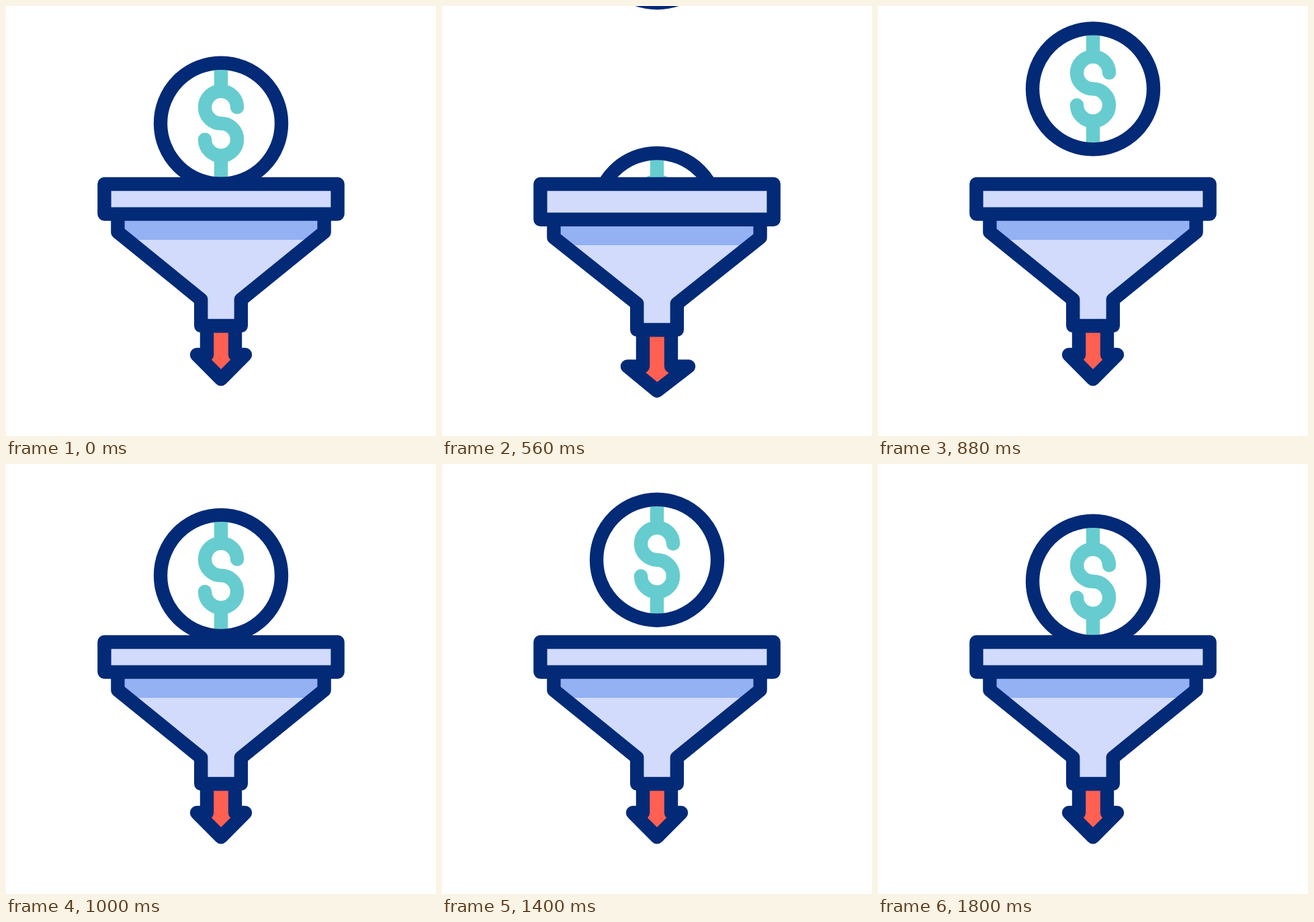
Write an HTML page that moves like this. It is 640 by 640 pixels and loops after 2 s.

```html
<!DOCTYPE html>
<html lang="en">
<head>
<meta charset="utf-8">
<title>Coin funnel</title>
<style>
  html, body { margin: 0; width: 100%; height: 100%; overflow: hidden; background: #fff; }
  svg { display: block; width: 100vw; height: 100vh; }
  .line { stroke: #032a77; stroke-width: 20.4; stroke-linejoin: round; stroke-linecap: round; }
  .teal { fill: none; stroke: #67cccf; stroke-width: 20.4; }
</style>
</head>
<body>
<svg viewBox="0 0 640 640">
  <defs>
    <clipPath id="above"><rect width="640" height="265"/></clipPath>
    <g id="coin">
      <circle r="90" fill="#fff"/>
      <path class="teal" d="M0-48V-88M0 48V88"/>
      <path class="teal" stroke-linecap="round" d="M24-24A24 24 0 1 0 0 0A24 24 0 1 1-24 24"/>
      <circle class="line" r="90" fill="none"/>
    </g>
  </defs>
  <path id="arrow" class="line" fill="#ff6052"/>
  <g clip-path="url(#above)">
    <use id="oldCoin" href="#coin"/>
    <use id="newCoin" href="#coin"/>
  </g>
  <path id="body" fill="#d2dbfc"/>
  <path id="shade" fill="#93b1f3"/>
  <path id="edge" class="line" fill="none"/>
  <path id="rim" class="line" fill="#d2dbfc"/>
</svg>
<script>
const LOOP = 2000, STEP = 40, REST = 174.7;
const $ = id => document.getElementById(id);
const ramp = (t, a, b) => Math.min(1, Math.max(0, (t - a) / (b - a)));
const ease = u => (1 - Math.cos(Math.PI * u)) / 2;

// Hop up a little, then drop into the funnel.
function oldY(t) {
  const peak = 293;
  if (t < peak) return REST - 32.5 * ease(ramp(t, 90, peak));
  return REST - 32.5 + 0.00234 * (t - peak) ** 2;
}

// Fall in from above, land, and bounce once.
function newY(t) {
  const land = 940, end = 1760;
  if (t < land) {
    const d = land - t;
    return REST - 0.882 * d + 0.000455 * d * d;
  }
  const u = 2 * ramp(t, land, end) - 1;
  return REST - 32.5 * (1 - u * u);
}

function place(id, y) {
  const shown = y > -110 && y < 400;
  $(id).setAttribute("visibility", shown ? "visible" : "hidden");
  $(id).setAttribute("transform", `translate(320 ${y.toFixed(2)})`);
}

function draw(t) {
  const stretch = t < 660 ? ease(ramp(t, 345, 660)) : 1 - ease(ramp(t, 660, 855));
  const path = (id, d) => $(id).setAttribute("d", d);

  const low = 309.6 + 10.5 * stretch;
  const corner = low + 26.9;
  const band = low + 38.4;
  const drop = 7.7 * stretch;
  const neck = 437 + drop;
  const base = 476 + drop;
  const wall = `M166.4 ${low}V${corner}L290.2 ${neck}V${base}H349.8V${neck}L473.6 ${corner}V${low}`;
  const inset = 123.8 * (band - corner) / (neck - corner);

  path("rim", `M146.4 265H493.6V${low}H146.4Z`);
  path("body", wall);
  path("edge", wall);
  path("shade", `M166.4 ${low}V${corner}L${166.4 + inset} ${band}H${473.6 - inset}L473.6 ${corner}V${low}Z`);

  const wing = 519 + 22.5 * stretch;
  const tip = 555.2 + 22.7 * stretch;
  path("arrow", `M299 ${base}V${wing}H${284 - 10.4 * stretch}L320 ${tip}L${356 + 14.2 * stretch} ${wing}H341V${base}Z`);

  place("oldCoin", t < 800 ? oldY(t) : 999);
  place("newCoin", t > 500 ? newY(t) : -999);
}

const start = performance.now();
function tick() {
  const t = (performance.now() - start) % LOOP;
  draw(Math.floor(t / STEP) * STEP);
  requestAnimationFrame(tick);
}
tick();
</script>
</body>
</html>
```
